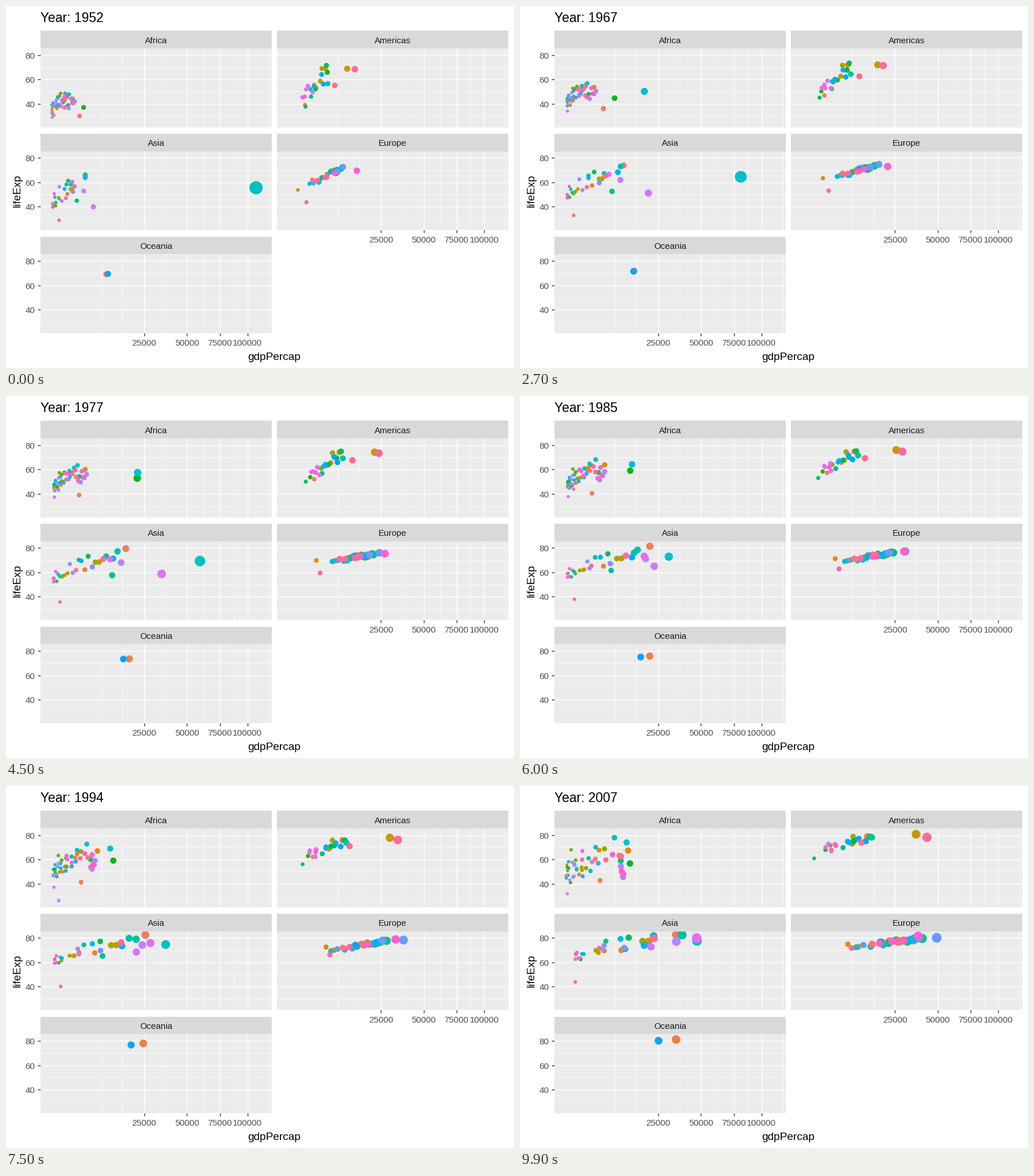
Animation of 885 by 632 pixels, one loop 10000 ms. Source, as a matplotlib script:

```python
import numpy as np
import matplotlib.pyplot as plt
from matplotlib.animation import FuncAnimation
from matplotlib.patches import Rectangle

W, H, DPI, FRAMES, HUES = 885, 632, 100, 100, 142
PT = 125 / 72                                  # pixels per point of the theme
PX = 72 / DPI                                  # figure points per pixel
PW, PH, ROW, STRIP = 402.7, 137.7, 179.7, 30.8
PANELS = [("Africa", 60, 74), ("Americas", 472.3, 74), ("Asia", 60, 74 + ROW),
          ("Europe", 472.3, 74 + ROW), ("Oceania", 60, 74 + 2 * ROW)]
AFRICA, AMERICAS, ASIA, EUROPE, OCEANIA = range(5)

# Square-root income axis and linear life axis, padded by 5 %
G_LO, G_HI = 241.2, 113523.1
r_lo, r_hi = np.sqrt([G_LO, G_HI])
R0, RSPAN = r_lo - 0.05 * (r_hi - r_lo), 1.1 * (r_hi - r_lo)
L_TOP, LSPAN = 85.553, 64.904
YEARS = 52 + 55 * np.arange(FRAMES) / (FRAMES - 1)
KEY_YEARS = 52, 77, 92, 107

rng = np.random.default_rng(7)
dots = [[] for _ in PANELS]                    # per panel: (hue, roots, lives)
used = set()


def px(root):
    return (root - R0) / RSPAN * PW


def py(life):
    return (L_TOP - life) / LSPAN * PH


def hue_color(i):
    """Evenly spaced hue in polar LUV with chroma 100 and luminance 65."""
    a = np.radians(15 + 360 * i / HUES)
    lum, chroma = 65, 100
    u = chroma * np.cos(a) / (13 * lum) + 0.1978
    v = chroma * np.sin(a) / (13 * lum) + 0.4683
    y = ((lum + 16) / 116) ** 3
    xyz = np.array([9 * u / (4 * v), 1, (12 - 3 * u - 20 * v) / (4 * v)]) * y
    lin = np.array([[3.2405, -1.5371, -0.4985],
                    [-0.9693, 1.8760, 0.0416],
                    [0.0556, -0.2040, 1.0572]]) @ xyz
    lin = np.clip(lin, 0, 1)
    return np.where(lin > 0.0031308, 1.055 * lin ** (1 / 2.4) - 0.055, 12.92 * lin)


def trace(panel, hue, *knots):
    """One dot that passes through (year, income, life) points."""
    t, g, life = np.transpose(knots)
    used.add(hue)
    dots[panel].append((hue, np.interp(YEARS, t, np.sqrt(g)),
                        np.interp(YEARS, t, life)))


def cloud(panel, count, power, poor, rich, life_poor, life_rich, noise):
    """Dots ranked by wealth between two moving ends, with drifting scatter."""
    r0, r1, l0, l1, sd = (np.interp(YEARS, KEY_YEARS, v)
                          for v in (poor, rich, life_poor, life_rich, noise))
    t = (YEARS - 52) / 55
    for rank in np.linspace(0, 1, count):
        drift = rng.normal(0, 0.07)
        q = np.clip(rank + drift * (2 * t - 1), 0, 1)
        a, b = np.clip(rng.normal(size=2), -1.7, 1.7)
        roots = r0 + (r1 - r0) * q ** power
        lives = l0 + (l1 - l0) * q + sd * (a + (0.6 * a + 0.8 * b - a) * t)
        dots[panel].append((hues.pop(), roots, np.minimum(lives, 82.6)))


# Dots that stand apart from the crowd
trace(OCEANIA, 5, (52, 10040, 69.1), (77, 18334, 73.5), (92, 23425, 77.6), (107, 34435, 81.2))
trace(OCEANIA, 91, (52, 10557, 69.4), (67, 14464, 71.5), (92, 18363, 76.3), (107, 25185, 80.2))
trace(ASIA, 71, (52, 108382, 55.6), (57, 113523, 58), (67, 80895, 64.6), (72, 109348, 67.7),
      (77, 59265, 69.3), (84, 29500, 72.6), (107, 47307, 77.6))
trace(ASIA, 109, (52, 6459, 39.9), (77, 34168, 58.7), (87, 21198, 66.3), (107, 21655, 72.8))
trace(ASIA, 60, (52, 3035, 44.9), (77, 11889, 57.7), (84, 7200, 61), (107, 11606, 71))
trace(ASIA, 113, (52, 2315, 60.4), (77, 11210, 70.8), (107, 47143, 80))
trace(ASIA, 0, (52, 779, 28.8), (107, 975, 43.8))
trace(AFRICA, 75, (52, 2388, 42.7), (62, 6757, 47.8), (67, 18773, 50.2), (77, 21951, 57.4),
      (89, 11000, 67.2), (107, 12057, 74))
trace(AFRICA, 45, (52, 4293, 37), (67, 8359, 44.6), (77, 21746, 52.8), (87, 11864, 60.2),
      (107, 13206, 56.7))
trace(AFRICA, 3, (52, 3521, 30), (67, 5523, 36), (80, 2900, 39.8), (107, 4797, 42.7))
trace(AFRICA, 107, (52, 493, 40), (87, 848, 44), (92, 737, 23.6), (107, 863, 46.2))
trace(AMERICAS, 20, (52, 11367, 68.8), (77, 22091, 74.2), (107, 36319, 80.7))
trace(AMERICAS, 134, (52, 13990, 68.4), (77, 24073, 73.4), (107, 42952, 78.2))
trace(AMERICAS, 136, (52, 7690, 55.1), (77, 13144, 67.5), (107, 11416, 73.7))
trace(AMERICAS, 53, (52, 1840, 37.6), (77, 1874, 49.9), (107, 1202, 60.9))
trace(EUROPE, 95, (52, 10095, 72.7), (107, 49357, 80.2))
trace(EUROPE, 123, (52, 14734, 69.6), (77, 26982, 75.4), (107, 37506, 81.7))
trace(EUROPE, 131, (52, 1969, 43.6), (77, 4269, 59.5), (107, 8458, 71.8))
trace(EUROPE, 12, (52, 974, 53.8), (77, 3528, 69.9), (107, 7446, 74.9))

# The crowd: ends of the income range and life at each end, per key year
hues = list(rng.permutation([h for h in range(HUES) if h not in used]))
cloud(AFRICA, 48, 1.7, (17, 20, 19, 17), (52, 70, 84, 112),
      (36, 45, 48, 49), (45, 60, 66, 65), (4.5, 4.5, 5.5, 8))
cloud(AMERICAS, 21, 1.1, (37, 50, 46, 52), (77, 100, 104, 125),
      (43, 54, 63, 69), (65, 72, 74, 78), (5, 3.5, 2.5, 2))
cloud(ASIA, 28, 1.8, (18, 19, 19, 31), (68, 130, 162, 200),
      (38, 51, 58, 62), (62, 75, 79, 82), (5, 4, 3, 3))
cloud(EUROPE, 26, 0.8, (49, 84, 78, 95), (99, 147, 163, 200),
      (60, 70, 70, 73.5), (71.5, 75, 78, 80.5), (1.5, 1, 0.8, 0.9))

plt.rcParams["font.family"] = "Liberation Sans"
fig = plt.figure(figsize=(W / DPI, H / DPI), dpi=DPI, facecolor="white")
ax = fig.add_axes([0, 0, 1, 1])
ax.set(xlim=(0, W), ylim=(H, 0))
ax.axis("off")


def label(x, y, s, pt, color, ha="center", **kw):
    return ax.text(x, y, s, fontsize=pt * PT * PX, color=color, ha=ha,
                   va="baseline", **kw)


def line(x0, y0, x1, y1, color, width):
    ax.plot([x0, x1], [y0, y1], color=color, lw=width * PX,
            solid_capstyle="butt", zorder=1)


def box(x, y, w, h, color):
    ax.add_patch(Rectangle((x, y), w, h, fc=color, lw=0, zorder=0))


x_breaks = np.arange(25000, 100001, 25000)
major = np.sqrt(x_breaks)
step = major[1] - major[0]
ends = np.r_[major[0] - step, major, major[-1] + step]
minor = np.r_[ends[0], (ends[1:] + ends[:-1]) / 2]

layers = []
for k, (name, x, y) in enumerate(PANELS):
    box(x, y - STRIP, PW, STRIP, "#D9D9D9")
    box(x, y, PW, PH, "#EBEBEB")
    label(x + PW / 2, y - 9.4, name, 8.8, "#1A1A1A")
    for lives, roots, width in (((30, 50, 70), minor, 0.7),
                                ((40, 60, 80), major, 1.4)):
        for v in lives:
            line(x, y + py(v), x + PW, y + py(v), "white", width)
        for r in roots:
            line(x + px(r), y, x + px(r), y + PH, "white", width)
    if x < 100:
        for v in (40, 60, 80):
            line(x - 4.8, y + py(v), x, y + py(v), "#333333", 1.4)
            label(x - 9.5, y + py(v) + 6, str(v), 8.8, "#4D4D4D", "right")
    if k in (EUROPE, OCEANIA):
        for r, v in zip(major, x_breaks):
            line(x + px(r), y + PH, x + px(r), y + PH + 4.8, "#333333", 1.4)
            label(x + px(r), y + PH + 21.6, str(v), 8.8, "#4D4D4D")

    order, roots, lives = zip(*sorted(dots[k], key=lambda d: d[0]))
    roots, lives = np.array(roots), np.array(lives)
    size = 1 + 5 * np.sqrt(np.clip(roots ** 2 - G_LO, 0, None) / (G_HI - G_LO))
    diam = 0.75 * (size * 2.845 + 0.945) * PT
    area = (diam * PX) ** 2
    xy = np.stack([x + px(roots), y + py(lives)], axis=-1)
    pts = ax.scatter(xy[:, 0, 0], xy[:, 0, 1], s=area[:, 0], lw=0, zorder=3,
                     c=[hue_color(h) for h in order])
    pts.set_clip_path(Rectangle((x, y), PW, PH, transform=ax.transData))
    layers.append((pts, xy, area))

label(467.5, 618, "gdpPercap", 11, "black")
label(25, 322.7, "lifeExp", 11, "black", rotation=90, rotation_mode="anchor")
title = label(60, 28, "", 13.2, "black", "left")
ax.set(xlim=(0, W), ylim=(H, 0))


def draw(i):
    title.set_text(f"Year: {round(1900 + YEARS[i])}")
    for pts, xy, area in layers:
        pts.set_offsets(xy[:, i])
        pts.set_sizes(area[:, i])
    return [title] + [layer[0] for layer in layers]


anim = FuncAnimation(fig, draw, frames=FRAMES, interval=100, repeat=True,
                     repeat_delay=0, blit=False)
plt.show()
```
